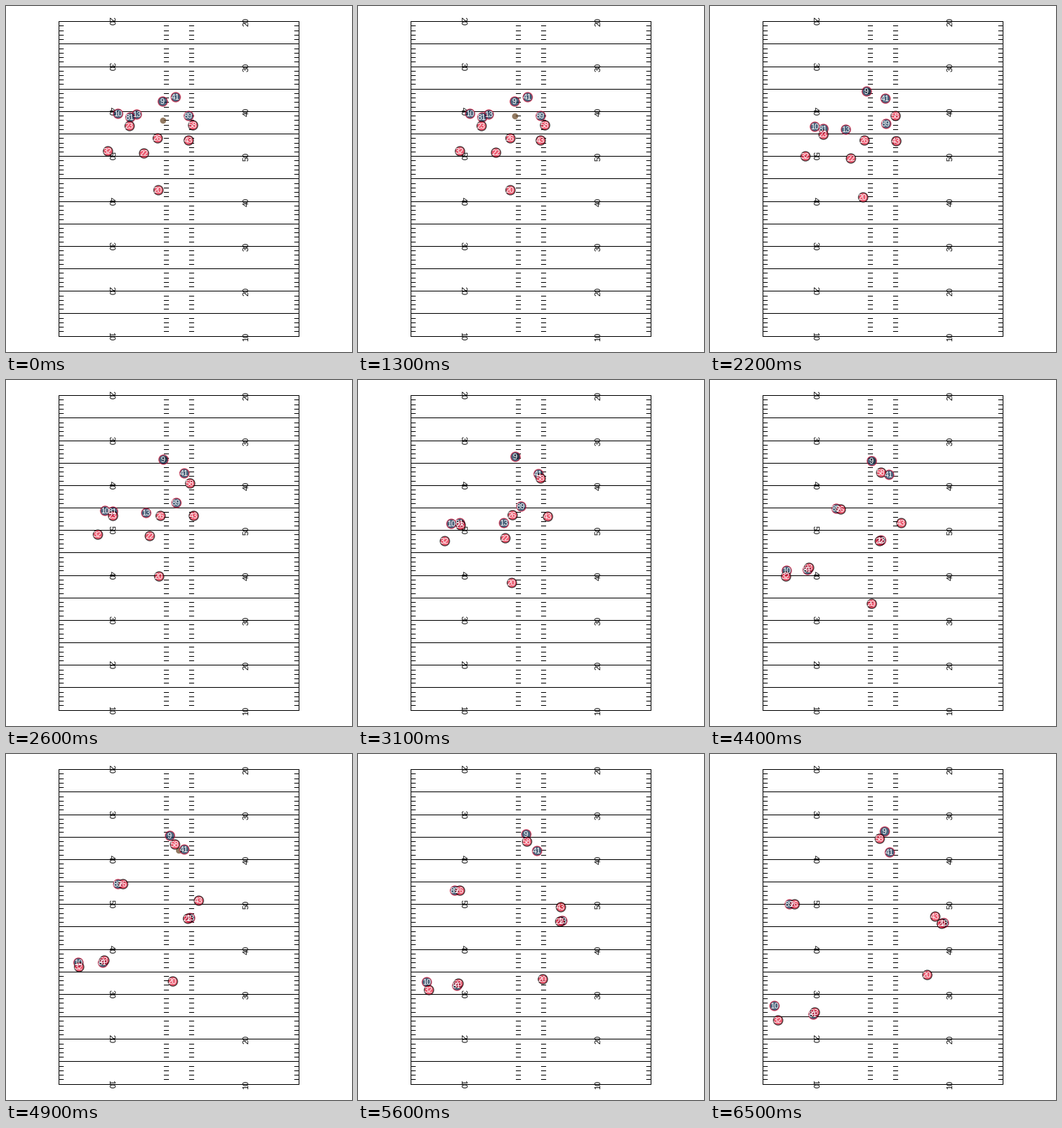
A matplotlib script for the animation above (6600 ms loop, 480 px wide and 480 px high).

```python
import numpy as np
import matplotlib.pyplot as plt
from matplotlib.animation import FuncAnimation

SIZE, DPI = 480, 100
FRAMES, STEP = 66, 100
PX = 72 / DPI  # points per pixel
LEFT, RIGHT = 73, 406
SNAP, HELD, THROW, CATCH = 1.2, 1.75, 4.7, 5.8  # seconds
QB, TARGET = 9, 13

plt.rcParams["font.family"] = "Liberation Sans"

# Routes: where a player is at the snap, 3.1 s, 4.9 s and 6.5 s
KEYS = np.array([SNAP, 3.1, 4.9, 6.5])
OFFENSE = {
    9: [(217, 132), (218, 106), (227, 113), (242, 107)],
    10: [(155, 149), (129, 199), (100, 289), (89, 349)],
    13: [(181, 150), (202, 198), (255, 227), (324, 234)],
    41: [(235, 126), (250, 130), (247, 132), (249, 136)],
    81: [(172, 154), (141, 198), (134, 289), (143, 361)],
    89: [(253, 152), (226, 175), (155, 180), (110, 208)],
}
ZONE = {
    20: [(211, 255), (213, 281), (231, 315), (301, 306)],
    32: [(141, 201), (120, 223), (101, 295), (94, 369)],
    43: [(253, 186), (263, 189), (267, 203), (312, 225)],
    58: [(259, 165), (253, 136), (234, 125), (235, 117)],
}
# Man coverage: receiver, offset before the snap, offset once closed in
MAN = {
    22: (13, (10, 54), (-3, 1)),
    23: (81, (-1, 12), (2, -3)),
    26: (89, (-43, 31), (7, 0)),
}


def progress(t, start, end):
    return np.clip((t - start) / (end - start), 0, 1)


def mix(a, b, u):
    return np.add(a, u * np.subtract(b, a))


def route(points, t):
    """Monotone cubic through the points, at rest until the snap."""
    p = np.array(points, float)
    h = np.diff(KEYS)[:, None]
    d = np.diff(p, axis=0) / h
    a, b = d[:-1], d[1:]
    same = a * b > 0
    m = np.zeros_like(p)
    m[1:-1] = np.where(same, 2 * a * b / np.where(same, a + b, 1), 0)
    m[-1] = d[-1]
    t = max(t, SNAP)
    i = min(np.searchsorted(KEYS, t, side="right") - 1, len(h) - 1)
    u = (t - KEYS[i]) / h[i]
    return (mix(p[i], p[i + 1], u * u * (3 - 2 * u))
            + u * (1 - u) * h[i] * ((1 - u) * m[i] - u * m[i + 1]))


def cover(man, t):
    receiver, loose, tight = man
    u = progress(t, 1.0, 4.6)
    return route(OFFENSE[receiver], t) + mix(loose, tight, u * u * (3 - 2 * u))


def carried(num, t):
    return route(OFFENSE[num], t) + (2, 0)


def ball_at(t):
    if t < THROW:
        return mix((218, 159), carried(QB, max(t, HELD)), progress(t, SNAP, HELD))
    return mix(carried(QB, THROW), carried(TARGET, max(t, CATCH)),
               progress(t, THROW, CATCH))


def offense_at(t):
    return {n: route(p, t) for n, p in OFFENSE.items()}


def defense_at(t):
    return {**{n: route(p, t) for n, p in ZONE.items()},
            **{n: cover(m, t) for n, m in MAN.items()}}


fig = plt.figure(figsize=(SIZE / DPI, SIZE / DPI), dpi=DPI, facecolor="white")
ax = fig.add_axes([0, 0, 1, 1])
ax.set(xlim=(0, SIZE), ylim=(SIZE, 0))
ax.axis("off")
LINE = dict(colors="black", linewidths=PX, antialiased=False, zorder=1)


def write(x, y, text, size, color, z, angle=0):
    return ax.text(x, y, text, size=size * PX, color=color, zorder=z, rotation=angle,
                   rotation_mode="anchor", ha="center", va="center_baseline")


def yard_y(yard):
    return np.floor(21.65 + 6.236 * yard)


for yard in range(71):
    y = yard_y(yard)
    if yard % 5 == 0:
        ax.hlines(y, LEFT, RIGHT, **LINE)
    else:
        for x in (LEFT, 219, 254, RIGHT - 6):
            ax.hlines(y, x, x + 6, **LINE)
    if yard % 10 == 0:
        for x, angle in ((146.5, 270), (332.5, 90)):
            write(x, y + 0.5, str(50 - abs(30 - yard)), 11, "black", 2, angle)
ax.vlines([LEFT, RIGHT], yard_y(0), yard_y(70), **LINE)


def discs(n, diameter, fill, edge, width, z, smooth=False):
    return ax.scatter(np.zeros(n), np.zeros(n), s=(diameter * PX) ** 2, c=fill,
                      edgecolors=edge, linewidths=width * PX, alpha=0.7,
                      antialiased=smooth, snap=False, zorder=z)


ball = discs(1, 8.5, "#654321", "none", 0, 3, smooth=True)
teams = [(offense_at, discs(6, 13, "#002244", "#c60c30", 1.3, 4)),
         (defense_at, discs(7, 13, "#e31837", "black", 1.3, 5))]
labels = {n: write(0, 0, str(n), 11, "white", 6) for n in (*OFFENSE, *ZONE, *MAN)}


def update(frame):
    t = frame * STEP / 1000
    ball.set_offsets([np.round(ball_at(t))])
    for squad_at, dots in teams:
        spots = {n: np.round(p) for n, p in squad_at(t).items()}
        dots.set_offsets(list(spots.values()))
        for n, spot in spots.items():
            labels[n].set_position(spot)
    return [ball, *(d for _, d in teams), *labels.values()]


anim = FuncAnimation(fig, update, frames=FRAMES, interval=STEP, repeat=True,
                     repeat_delay=0, blit=False)
plt.show()
```
